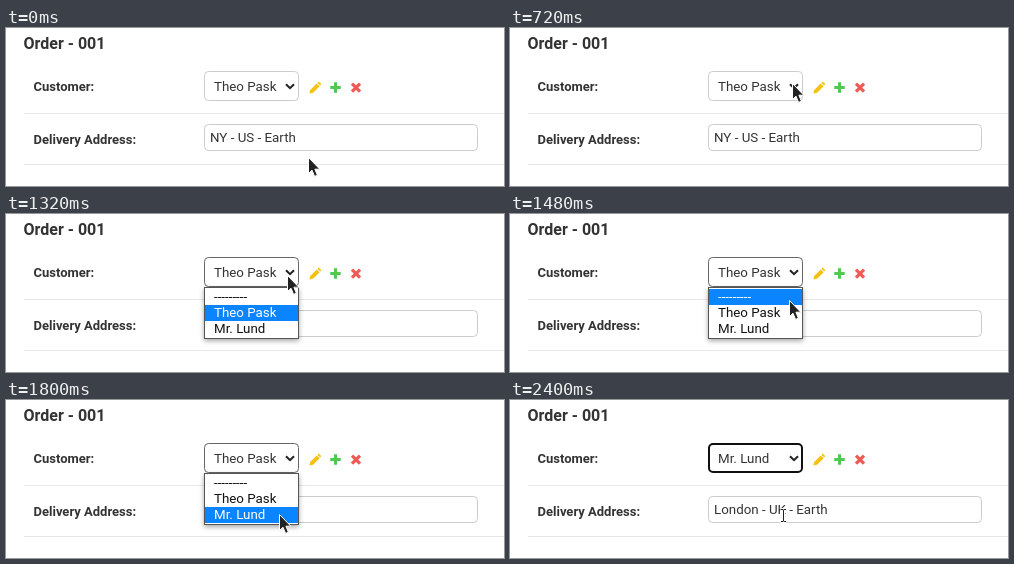
Recreate the animation shown at these times as an HTML page. Size 498 px wide and 158 px high, loop 3 s.

```html
<!DOCTYPE html>
<html lang="en">
<head>
<meta charset="utf-8">
<title>Order form</title>
<style>
  html, body { margin: 0; width: 100%; height: 100%; overflow: hidden; background: #fff; }
  svg { display: block; width: 498px; height: 158px; }
  text { font: 13.33px Roboto, sans-serif; fill: #333; white-space: pre; }
  .label { font-size: 13px; font-weight: 700; }
  .title { font-size: 16px; font-weight: 700; }
  .box { fill: #fff; stroke: #ccc; }
  .rule { stroke: #e8e8e8; }
  #popup { filter: drop-shadow(0 2px 2.5px rgba(0, 0, 0, .35)); }
  #popup text { fill: #111; }
  #popup text.on { fill: #fff; }
</style>
</head>
<body>
<svg viewBox="0 0 498 158">
  <text class="title" x="17.5" y="21">Order - 001</text>
  <text class="label" x="27.5" y="63">Customer:</text>
  <text class="label" x="27.5" y="116">Delivery Address:</text>
  <path class="rule" d="M18 85.5H498M18 136.5H498"/>

  <rect id="select" class="box" rx="4"/>
  <text id="customer" x="208" y="63"></text>
  <path d="M280 56.2l4 4 4-4" fill="none" stroke="#222" stroke-width="2"/>

  <path fill="#f5c211" d="M303.4 65.6l.8-3.7 6.5-6.5 2.9 2.9-6.5 6.5zM311.4 54.7l1.3-1.2 2.6 2.6-1.2 1.4z"/>
  <path stroke="#4fc94f" stroke-width="3" d="M324.3 59.5h10.4M329.5 54.3v10.4"/>
  <path stroke="#f05a55" stroke-width="3.2" d="M346 55.7l8 8M354 55.7l-8 8"/>

  <rect class="box" x="198.5" y="96.5" width="273" height="26" rx="4"/>
  <text id="address" x="204" y="114"></text>

  <g id="popup">
    <rect x="198.5" y="73.5" width="94" height="51" fill="#fff" stroke="#555"/>
    <rect id="highlight" x="199" width="93" height="16" fill="#0a84ff"/>
    <text x="208" y="87">---------</text>
    <text x="208" y="103">Theo Pask</text>
    <text x="208" y="119">Mr. Lund</text>
  </g>

  <path id="arrow" fill="#222" stroke="#fff" stroke-linejoin="round"
        d="M.5 .5V16.5L4 13.2L6.6 19.4L9.4 18.2L6.9 12.2H11.8Z"/>
  <g id="beam" fill="none">
    <path stroke="#fff" stroke-width="3" d="M270.5 109.5h6M273.5 109v13M270.5 121.5h6"/>
    <path stroke="#222" d="M271 109.5h2l.5 .5 .5-.5h2M273.5 110v11M271 121.5h2l.5-.5 .5 .5h2"/>
  </g>
</svg>
<script>
  const LOOP = 3000, TICK = 40;
  const OPEN = 920, CHOOSE = 2280, BEAM = 2320, LOADED = 2400;
  const $ = id => document.getElementById(id);
  const rows = [...document.querySelectorAll('#popup text')];

  // time, x, y of the pointer
  const path = [
    [0, 302, 129], [160, 302, 129], [400, 292, 84], [560, 285, 66], [720, 281.5, 55],
    [1280, 281.5, 55], [1320, 281, 61], [1600, 277, 105], [1800, 273, 114], [LOOP, 273, 114]
  ];

  function pointerAt(t) {
    const i = path.findIndex(p => p[0] > t);
    const [t0, x0, y0] = path[i - 1], [t1, x1, y1] = path[i];
    const k = (t - t0) / (t1 - t0);
    return [Math.round(x0 + (x1 - x0) * k), Math.round(y0 + (y1 - y0) * k)];
  }

  function show(id, visible) {
    $(id).style.display = visible ? '' : 'none';
  }

  function setAttrs(id, attrs) {
    for (const name in attrs) $(id).setAttribute(name, attrs[name]);
  }

  function draw(t) {
    const [x, y] = pointerAt(t);
    const open = t >= OPEN && t < CHOOSE, chosen = t >= CHOOSE;

    // the pointer highlights the row below it; the current value is the default
    const hover = y + 1 < 74 ? 1 : y + 1 < 91 ? 0 : y + 1 < 107 ? 1 : 2;
    $('highlight').setAttribute('y', 75 + 16 * hover);
    rows.forEach((row, i) => row.classList.toggle('on', i === hover));

    const line = chosen ? 2 : 1;
    setAttrs('select', { x: 198 + line / 2, y: 43 + line / 2, width: 95 - line, height: 30 - line });
    $('select').style.strokeWidth = line;
    $('select').style.stroke = chosen ? '#101010' : open ? '#666' : '#ccc';

    $('customer').textContent = rows[chosen ? 2 : 1].textContent;
    $('address').textContent = t >= LOADED ? 'London - UK - Earth' : 'NY - US - Earth';
    // the field text sits wholly behind the list while it is open
    show('popup', open);
    show('arrow', t < BEAM);
    show('beam', t >= BEAM);
    $('arrow').setAttribute('transform', `translate(${x} ${y})`);
  }

  const start = performance.now();
  function frame() {
    const t = (performance.now() - start) % LOOP;
    draw(Math.floor(t / TICK) * TICK);
    requestAnimationFrame(frame);
  }
  frame();
</script>
</body>
</html>
```
